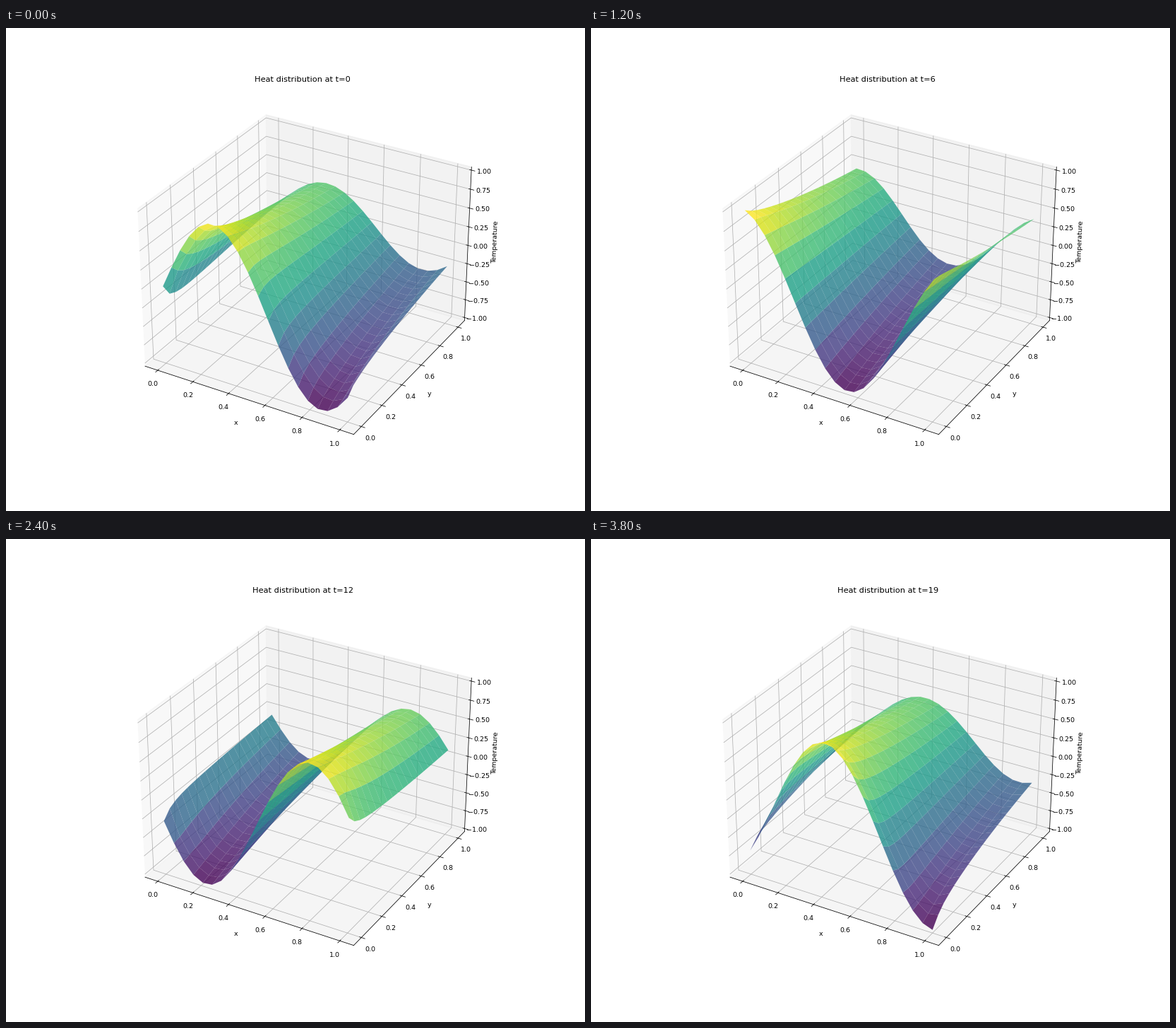
A matplotlib script for the animation above (4000 ms loop, 820 by 683 pixels).

```python
import numpy as np
import matplotlib.pyplot as plt
from matplotlib.animation import FuncAnimation

N = 20              # samples along every axis
WAVE = 5.485        # wave number of the starting field
DIFFUSIVITY = 0.01
DPI = 820 / 12
MARGIN = 1 / 48     # extra room around the axis limits


def diffuse(field, steps, rate):
    """Explicit heat steps on a periodic grid; returns all states."""
    states = [field]
    for _ in range(steps):
        u = states[-1]
        around = sum(np.roll(u, shift, axis) for shift in (1, -1) for axis in (0, 1))
        states.append(u + rate * (around - 4 * u))
    return np.array(states)


def padded(low, high):
    pad = (high - low) * MARGIN
    return low - pad, high + pad


grid = np.linspace(0, 1, N)
step = grid[1]
X, Y = np.meshgrid(grid, grid)
start = np.sin(WAVE * (grid[:, None] + grid[None, :]))
heat = diffuse(start, N - 1, DIFFUSIVITY * step / step**2)   # [y, t, x]

fig = plt.figure(figsize=(820 / DPI, 683 / DPI), dpi=DPI)
ax = fig.add_subplot(projection="3d")
ax.set(xlabel="x", ylabel="y", zlabel="Temperature",
       xlim=padded(-0.05, 1.05), ylim=padded(-0.05, 1.05), zlim=padded(-1, 1))
surface = None


def draw(t):
    global surface
    if surface is not None:
        surface.remove()
    surface = ax.plot_surface(X, Y, heat[:, t, :], cmap="viridis", alpha=0.8)
    ax.set_title(f"Heat distribution at t={t}")
    return surface,


anim = FuncAnimation(fig, draw, frames=N, init_func=lambda: (), interval=200,
                     repeat=True, repeat_delay=0, blit=False)
plt.show()
```
